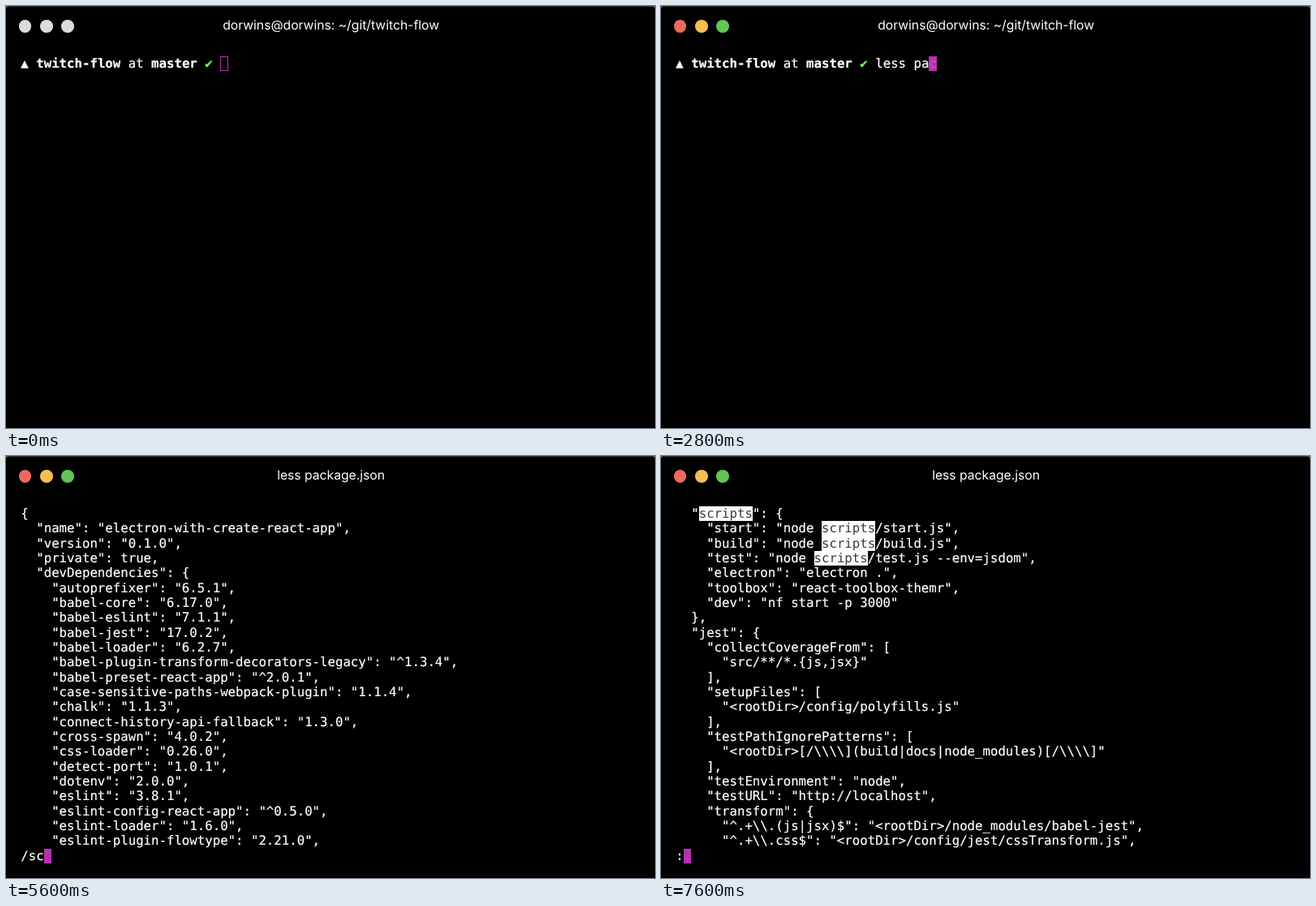
Recreate the animation shown at these times as an HTML page. Size 800 px wide and 520 px high, loop 8 s.

```html
<!DOCTYPE html>
<html lang="en">
<head>
<meta charset="utf-8">
<title>Terminal</title>
<style>
  html, body { margin: 0; width: 100%; height: 100%; overflow: hidden; background: #777; }
  #win {
    position: relative; width: 800px; height: 520px; box-sizing: border-box; overflow: hidden;
    background: #000; color: #fff; text-rendering: geometricPrecision;
    border-radius: 4px 4px 0 0;
  }
  #win::before {
    content: ""; position: absolute; inset: 0; height: 20px;
    border-top: 1px solid #3a3a3a; border-radius: 4px 4px 0 0;
  }
  #title {
    position: absolute; left: 0.6px; top: 14px; width: 800px; text-align: center;
    font: 15.7px/20px Inter, sans-serif;
  }
  .light {
    position: absolute; top: 17px; left: var(--x); width: 15.7px; height: 15.7px;
    border-radius: 50%; background: var(--c);
  }
  .idle .light { background: #dcdcdc; }
  pre {
    position: absolute; left: 18.33px; top: 62px; margin: 0;
    font: 15.71px/18.33px "DejaVu Sans Mono", monospace;
    -webkit-text-stroke: 0.2px;
  }
  #status { top: 483.6px; }
  mark {
    display: inline-block; vertical-align: top; background: #fff; color: #3a3a3a;
    -webkit-text-stroke: 0;
  }
  i { color: #79f35d; font-style: normal; }
  #cursor {
    position: absolute; width: 9.46px; height: 18.33px; box-sizing: border-box;
    background: rgba(203, 55, 196, .9);
  }
  .idle #cursor { background: none; border: 1px solid #b732b0; }
  [hidden] { display: none; }
</style>
</head>
<body>
<div id="win">
  <div id="title"></div>
  <div class="light" style="--x:15.7px;--c:#ed6a5e"></div>
  <div class="light" style="--x:41.9px;--c:#f6be4f"></div>
  <div class="light" style="--x:68.1px;--c:#62c554"></div>

<pre id="shell">▲ <b>twitch-flow</b> at <b>master</b> <i>✔</i> <span id="cmd"></span></pre>

<pre id="top">
{
  "name": "electron-with-create-react-app",
  "version": "0.1.0",
  "private": true,
  "devDependencies": {
    "autoprefixer": "6.5.1",
    "babel-core": "6.17.0",
    "babel-eslint": "7.1.1",
    "babel-jest": "17.0.2",
    "babel-loader": "6.2.7",
    "babel-plugin-transform-decorators-legacy": "^1.3.4",
    "babel-preset-react-app": "^2.0.1",
    "case-sensitive-paths-webpack-plugin": "1.1.4",
    "chalk": "1.1.3",
    "connect-history-api-fallback": "1.3.0",
    "cross-spawn": "4.0.2",
    "css-loader": "0.26.0",
    "detect-port": "1.0.1",
    "dotenv": "2.0.0",
    "eslint": "3.8.1",
    "eslint-config-react-app": "^0.5.0",
    "eslint-loader": "1.6.0",
    "eslint-plugin-flowtype": "2.21.0",
</pre>

<pre id="found">
  "<mark>scripts</mark>": {
    "start": "node <mark>scripts</mark>/start.js",
    "build": "node <mark>scripts</mark>/build.js",
    "test": "node <mark>scripts</mark>/test.js --env=jsdom",
    "electron": "electron .",
    "toolbox": "react-toolbox-themr",
    "dev": "nf start -p 3000"
  },
  "jest": {
    "collectCoverageFrom": [
      "src/**/*.{js,jsx}"
    ],
    "setupFiles": [
      "&lt;rootDir>/config/polyfills.js"
    ],
    "testPathIgnorePatterns": [
      "&lt;rootDir>[/\\\\](build|docs|node_modules)[/\\\\]"
    ],
    "testEnvironment": "node",
    "testURL": "http://localhost",
    "transform": {
      "^.+\\.(js|jsx)$": "&lt;rootDir>/node_modules/babel-jest",
      "^.+\\.css$": "&lt;rootDir>/config/jest/cssTransform.js",
</pre>

<pre id="status"></pre>
  <div id="cursor"></div>
</div>
<script>
const LOOP = 8000, CELL = 9.458, LEFT = 18.33, PROMPT = 26;
const $ = id => document.getElementById(id);
const win = $('win'), cursor = $('cursor');

// [start ms, screen, text typed so far, cursor column if not at the end]
const steps = [
  [0, 'shell', ''],
  [2200, 'shell', 'le'],
  [2400, 'shell', 'less'],
  [2600, 'shell', 'less p'],
  [2800, 'shell', 'less pac', 7],
  [3000, 'shell', 'less pack'],
  [3200, 'shell', 'less package.json '],
  [5000, 'top', 'package.json'],
  [5200, 'top', '/'],
  [5400, 'top', '/s'],
  [5600, 'top', '/sc'],
  [5800, 'top', '/scri'],
  [6000, 'top', '/script'],
  [6200, 'top', '/scripts'],
  [6400, 'found', ':']
];
const FOCUS = 1000;
let shown;

function show([, screen, text, col = text.length]) {
  const shell = screen === 'shell';
  for (const id of ['shell', 'top', 'found']) $(id).hidden = id !== screen;
  $('title').textContent = shell ? 'dorwins@dorwins: ~/git/twitch-flow' : 'less package.json';
  $('cmd').textContent = shell ? text : '';
  const status = shell ? '' : text;
  $('status').innerHTML = status === 'package.json' ? `<mark>${status}</mark>` : status;
  cursor.style.left = LEFT + (col + (shell ? PROMPT : 0)) * CELL + 'px';
  cursor.style.top = (shell ? 62 : 483.6) + 'px';
}

function tick() {
  const t = performance.now() % LOOP;
  const step = steps.findLast(s => s[0] <= t);
  win.classList.toggle('idle', t < FOCUS);
  if (step !== shown) show(shown = step);
  requestAnimationFrame(tick);
}
tick();
</script>
</body>
</html>
```
